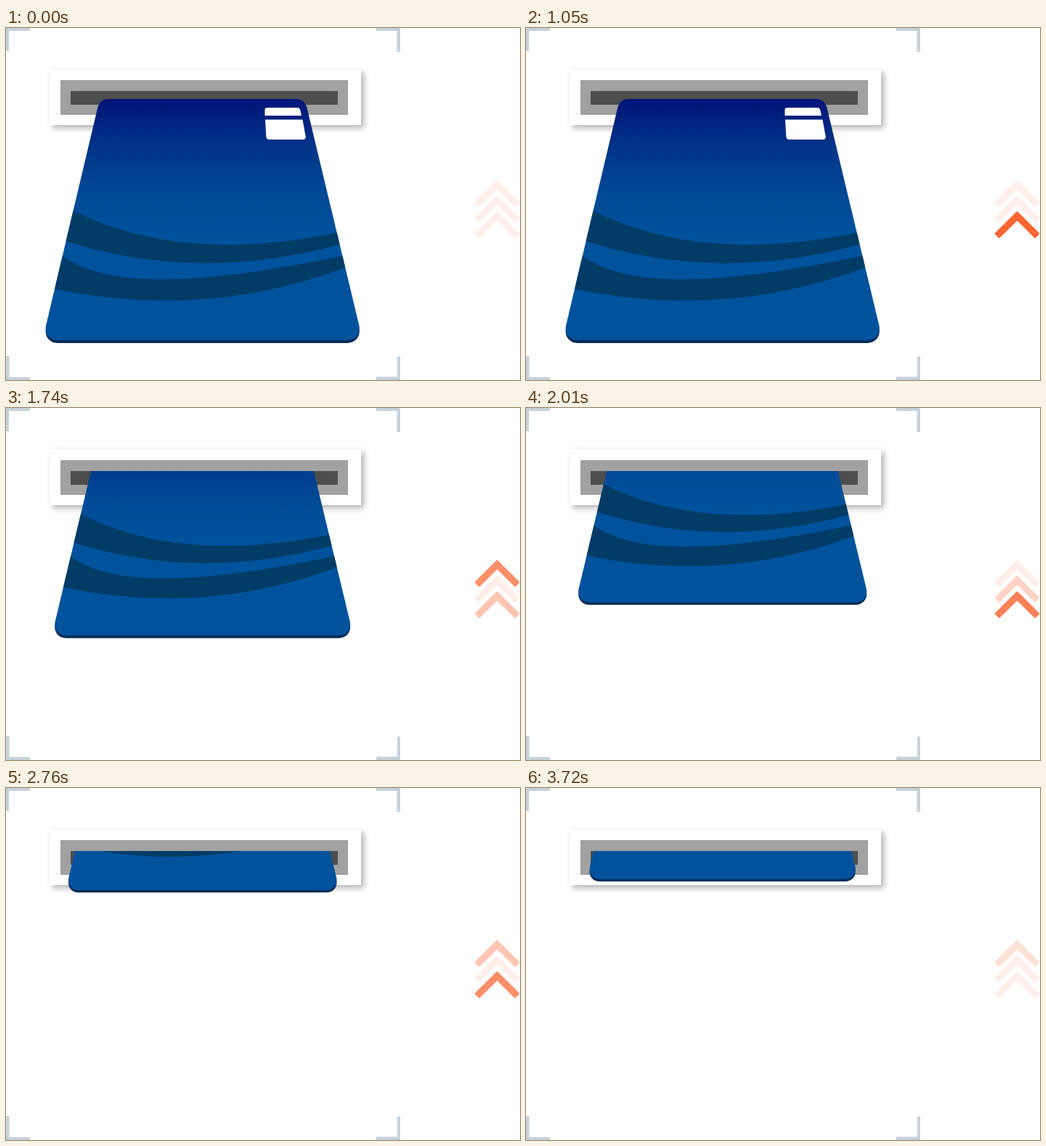
Write an HTML page that moves like this. It is 708 px wide and 486 px high and loops after 3.75 s.

```html
<!DOCTYPE html>
<html lang="en">
<head>
<meta charset="utf-8">
<title>Card insertion</title>
<style>
  html, body { margin: 0; width: 100%; height: 100%; overflow: hidden; background: #fff; }
  svg { display: block; width: 708px; height: 486px; }
</style>
</head>
<body>
<svg viewBox="0 0 708 486" xmlns="http://www.w3.org/2000/svg">
  <defs>
    <linearGradient id="blue" gradientUnits="userSpaceOnUse" x1="0" y1="98" x2="0" y2="431">
      <stop offset="0" stop-color="#001478"/>
      <stop offset=".2" stop-color="#003489"/>
      <stop offset=".4" stop-color="#004a96"/>
      <stop offset=".58" stop-color="#00529c"/>
    </linearGradient>
    <filter id="shadow" x="-10%" y="-30%" width="120%" height="160%">
      <feDropShadow dx="4" dy="4" stdDeviation="4" flood-color="#000" flood-opacity=".3"/>
    </filter>
    <path id="face" d="M141 98H399Q411 98 414.5 110L486.5 411C488.5 421 482 431 470 431H71C59 431 53 421 55 411L126 111Q129.5 98 141 98Z"/>
    <clipPath id="faceClip"><use href="#face"/></clipPath>
    <clipPath id="slotClip"><rect y="87" width="708" height="399"/></clipPath>
    <path id="chevron" d="M676.5 211.5L705.6 240.6L701.2 245.2L676.5 220.6L651.8 245.2L647.4 240.6Z"
      fill="#ff6633" stroke="#ff6633" stroke-width="3" stroke-linejoin="round"/>
  </defs>

  <path fill="#c6d2d9" d="M0 0H33V4H4V32H0ZM510 0H543V33H538.5V4H510ZM0 453H4.5V482H33V486H0ZM539 453.5H543V486H510V481.5H539Z"/>

  <rect x="60" y="57" width="429" height="77" fill="#fff" filter="url(#shadow)"/>
  <rect x="75" y="72" width="396" height="48" fill="#a1a1a1"/>
  <rect x="89" y="87" width="368" height="19" fill="#4d4e4d"/>

  <g clip-path="url(#slotClip)">
    <g id="card">
      <use href="#face" y="4" fill="#002c58"/>
      <use href="#face" fill="url(#blue)"/>
      <g clip-path="url(#faceClip)" fill="#003c66">
        <path d="M92 252Q240 327 457 282.5L461 298.5Q265 353 81 294Z"/>
        <path d="M77 313.5Q159 380 465 314L469 330Q275 404 66 360Z"/>
      </g>
      <path fill="#fff" d="M360 110H401Q404.5 110 405.2 113L407 121H356.5V113.5Q356.3 110 360 110ZM357 126.5H408.5L412.8 150Q413 154 409 154H363Q358.6 154 358.4 150Z"/>
    </g>
  </g>

  <g id="arrows">
    <use href="#chevron" y="43.3"/>
    <use href="#chevron" y="21.4"/>
    <use href="#chevron"/>
  </g>
</svg>
<script>
  const LOOP = 3750, STEP = 30;
  const CENTER = 270.75, BOTTOM = 435;
  const PERIOD = 900, RAMP = 300, PULSES = 4;
  const card = document.getElementById('card');
  const arrows = [...document.getElementById('arrows').children];
  const clamp = v => Math.min(1, Math.max(0, v));

  // Each arrow glows in a linear rise and fall; a rise cut off by the loop start is shortened.
  function glow(t, firstPeak) {
    let level = 0;
    for (let k = 0; k < PULSES; k++) {
      const peak = firstPeak + k * PERIOD;
      const ramp = t < peak ? Math.min(RAMP, peak) : RAMP;
      level = Math.max(level, clamp(1 - Math.abs(t - peak) / ramp));
    }
    return 0.1 + 0.9 * level;
  }

  function draw(t) {
    const p = clamp((t - 1050) / 1800);
    const sx = 1 - 0.1526 * p, sy = 1 - 0.165 * p;
    card.setAttribute('transform',
      `translate(${CENTER} ${BOTTOM - 306 * p}) scale(${sx} ${sy}) translate(${-CENTER} ${-BOTTOM})`);
    arrows.forEach((el, i) => el.setAttribute('opacity', glow(t, 150 + 300 * i)));
  }

  const start = performance.now();
  function tick() {
    const t = (performance.now() - start) % LOOP;
    draw(Math.floor(t / STEP) * STEP);
    requestAnimationFrame(tick);
  }
  draw(0);
  requestAnimationFrame(tick);
</script>
</body>
</html>
```
